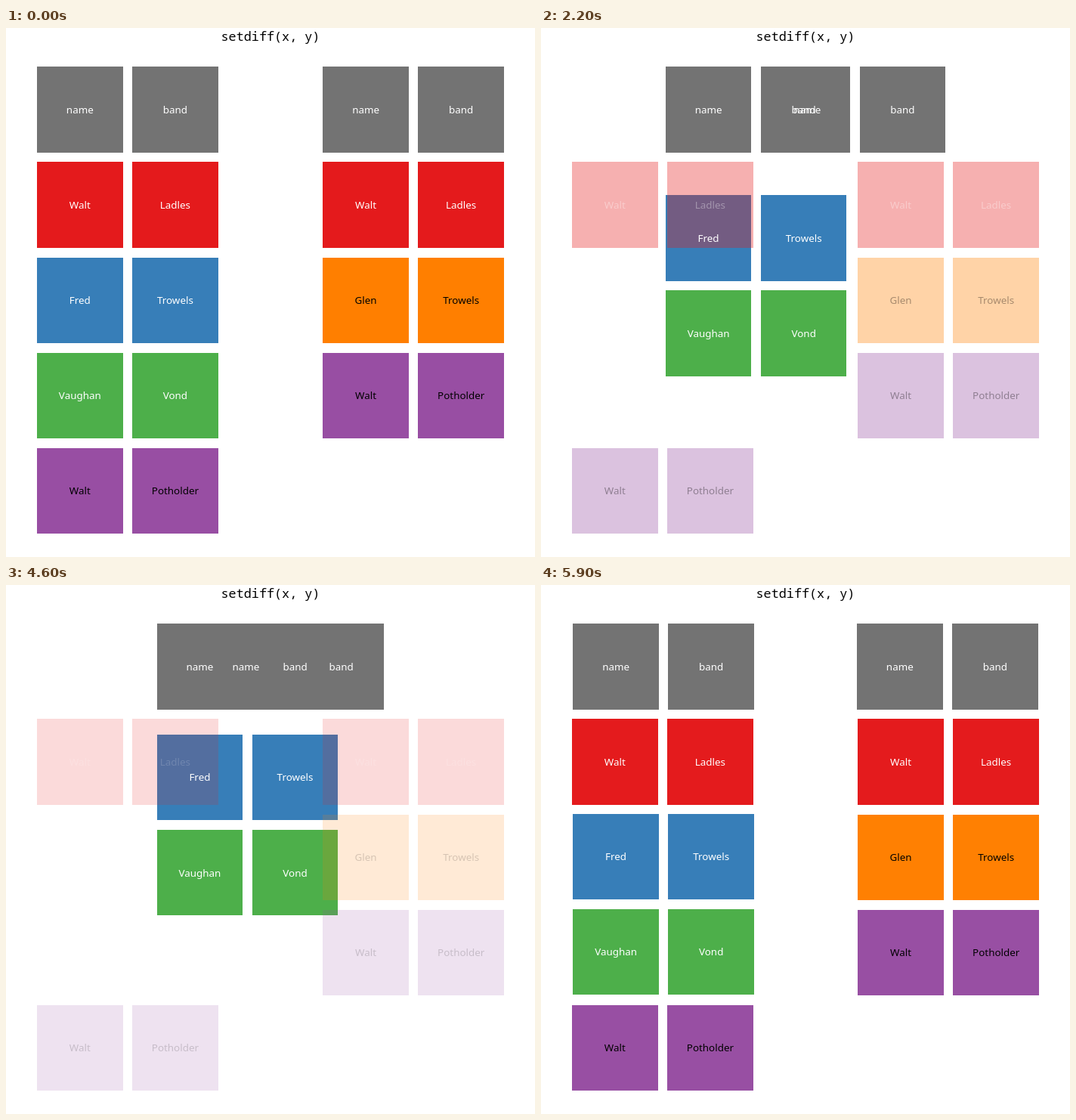
Recreate the animation shown at these times as an HTML page. Size 700x700 px, loop 6000 ms.

```html
<!DOCTYPE html>
<html lang="en">
<head>
<meta charset="utf-8">
<title>setdiff(x, y)</title>
<style>
  html, body { margin: 0; width: 100%; height: 100%; overflow: hidden; background: #fff; }
  svg { display: block; width: 100%; height: 100%; }
  text { text-anchor: middle; }
  #tiles { shape-rendering: crispEdges; }
  #labels { font: 13.4px "Noto Sans", sans-serif; }
  #title { font: 16.8px "Noto Sans Mono", monospace; }
</style>
</head>
<body>
<svg viewBox="0 0 700 700">
  <g id="tiles"></g>
  <g id="labels"></g>
  <text id="title" x="350" y="17">setdiff(x, y)</text>
</svg>
<script>
const LOOP = 6000, FRAME = 100;
const UNIT = 126.1, SIZE = UNIT * 0.9, MID_X = 350, MID_Y = 360.3;
const GRAY = '#737373', RED = '#e41a1c', BLUE = '#377eb8',
      GREEN = '#4daf4a', PURPLE = '#984ea3', ORANGE = '#ff7f00';

// Each row: column, row, fill, text colour, two labels, and the shift
// [columns, rows] to the result; rows without a shift fade out.
const rows = [
  [0, 0, GRAY, '#fff', ['name', 'band'], [1.5, 0]],
  [3, 0, GRAY, '#fff', ['name', 'band'], [-1.5, 0]],
  [0, 2, BLUE, '#fff', ['Fred', 'Trowels'], [1.5, -1]],
  [0, 3, GREEN, '#fff', ['Vaughan', 'Vond'], [1.5, -1]],
  [0, 1, RED, '#fff', ['Walt', 'Ladles']],
  [3, 1, RED, '#fff', ['Walt', 'Ladles']],
  [3, 2, ORANGE, '#000', ['Glen', 'Trowels']],
  [0, 4, PURPLE, '#000', ['Walt', 'Potholder']],
  [3, 3, PURPLE, '#000', ['Walt', 'Potholder']]
];

function add(parent, tag, fill) {
  const el = document.createElementNS('http://www.w3.org/2000/svg', tag);
  el.setAttribute('fill', fill);
  return document.getElementById(parent).appendChild(el);
}

function set(el, attrs) {
  for (const key in attrs) el.setAttribute(key, attrs[key]);
}

const cells = rows.flatMap(([col, row, fill, ink, names, shift]) =>
  names.map((name, i) => {
    const rect = add('tiles', 'rect', fill);
    const label = add('labels', 'text', ink);
    label.textContent = name;
    return { col: col + i, row, shift, rect, label };
  }));

const ease = p => (1 - Math.cos(Math.PI * Math.min(1, Math.max(0, p)))) / 2;

// 0 = both tables, 1 = result
const progress = t => ease((t - 1000) / 2000) - ease((t - 4100) / 1900);

function draw(ms) {
  const t = Math.floor(ms % LOOP / FRAME) * FRAME;
  const k = progress(t);
  for (const { col, row, shift, rect, label } of cells) {
    const [dx, dy] = shift || [0, 0];
    const x = MID_X + (col - 2 + dx * k) * UNIT;
    const y = MID_Y + (row - 2 + dy * k) * UNIT;
    const left = Math.round(x - SIZE / 2), top = Math.round(y - SIZE / 2);
    const opacity = shift ? 1 : 1 - k;
    set(rect, {
      x: left, y: top, opacity,
      width: Math.round(x + SIZE / 2) - left,
      height: Math.round(y + SIZE / 2) - top
    });
    set(label, { x, y: y + 4.9, opacity });
  }
}

const start = performance.now();
function tick() {
  draw(performance.now() - start);
  requestAnimationFrame(tick);
}
tick();
</script>
</body>
</html>
```
